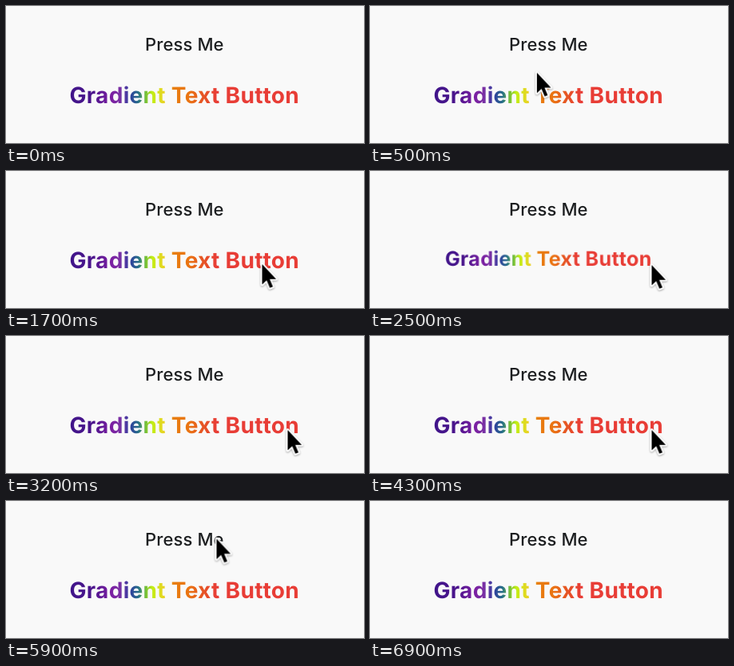
An HTML page for the animation above (7900 ms loop, 448x172 px).

```html
<!DOCTYPE html>
<html lang="en">
<head>
<meta charset="utf-8">
<title>Text buttons</title>
<style>
html, body { margin: 0; width: 100%; height: 100%; overflow: hidden; background: #f9f9f9; }
svg { display: block; width: 448px; height: 172px; }
text {
  font-family: Inter, "Liberation Sans", sans-serif;
  text-anchor: middle;
  text-rendering: geometricPrecision;
}
text, .cursor { animation: 7900ms step-end infinite; }

.plain {
  font-size: 22px; font-weight: 500; letter-spacing: .12px; fill: #1d1f21;
  animation-name: plain;
}
.rainbow {
  font-size: 28px; font-weight: 700; letter-spacing: .32px; fill: url(#hues);
  animation-name: rainbow;
}
.cursor {
  fill: #000; stroke: #fff; stroke-width: 3.8; stroke-linejoin: round;
  paint-order: stroke;
  filter: drop-shadow(0 1px 1px rgba(0, 0, 0, .35));
  animation-name: cursor;
}

@keyframes plain {
  0%, 15.189%, 74.683%, 100% { transform: translate(223.3px, 55.5px); }
  12.658%, 69.62% { transform: translate(223.3px, 53.7px) scale(.905); }
}

/* Moves up when the first button shrinks, shrinks when pressed itself */
@keyframes rainbow {
  0%, 15.189%, 34.177%, 54.43%, 74.683%, 100% { transform: translate(223.2px, 122px); }
  12.658%, 69.62% { transform: translate(223.2px, 118.5px); }
  31.645%, 46.835% { transform: translate(223.2px, 119px) scale(.9); }
}

@keyframes cursor {
  0% { transform: translate(-40px, 170px); }
  1.265% { transform: translate(-40px, 170px); animation-timing-function: steps(4, start); }
  6.329% { transform: translate(190px, 92px); animation-timing-function: steps(4, start); }
  11.392% { transform: translate(265.5px, 59px); }
  17.721% { transform: translate(265.5px, 59px); animation-timing-function: steps(4, start); }
  22.784% { transform: translate(320.5px, 117px); animation-timing-function: steps(2, start); }
  25.316% { transform: translate(348.5px, 127.5px); }
  27.848% { transform: translate(352.5px, 118px); }
  35.443% { transform: translate(352.5px, 118px); animation-timing-function: steps(2, start); }
  37.974% { transform: translate(350.5px, 121px); animation-timing-function: steps(3, start); }
  41.772% { transform: translate(352.5px, 118px); }
  56.962% { transform: translate(352.5px, 118px); animation-timing-function: steps(4, start); }
  62.025% { transform: translate(301px, 80.5px); animation-timing-function: steps(4, start); }
  67.088% { transform: translate(263.5px, 47.5px); }
  82.278%, 100% { transform: translate(-40px, 170px); }
}
</style>
</head>
<body>
<svg viewBox="0 0 448 172">
  <defs>
    <linearGradient id="hues">
      <stop offset="0" stop-color="#40158a"/>
      <stop offset=".1" stop-color="#4b148c"/>
      <stop offset=".18" stop-color="#7b1fa2"/>
      <stop offset=".22" stop-color="#7a30a4"/>
      <stop offset=".265" stop-color="#303f9f"/>
      <stop offset=".3" stop-color="#256f88"/>
      <stop offset=".33" stop-color="#6fbc3c"/>
      <stop offset=".36" stop-color="#c2ee14"/>
      <stop offset=".41" stop-color="#e8d424"/>
      <stop offset=".455" stop-color="#e87d10"/>
      <stop offset=".52" stop-color="#ea7412"/>
      <stop offset=".58" stop-color="#e65524"/>
      <stop offset=".64" stop-color="#e83d36"/>
      <stop offset="1" stop-color="#e83d36"/>
    </linearGradient>
  </defs>
  <text class="plain">Press Me</text>
  <text class="rainbow">Gradient Text Button</text>
  <path class="cursor" d="M0 0V25.6L5.7 20.2L9.7 29.8L13.5 28.2L9.5 18.7H17.6Z"/>
</svg>
</body>
</html>
```
